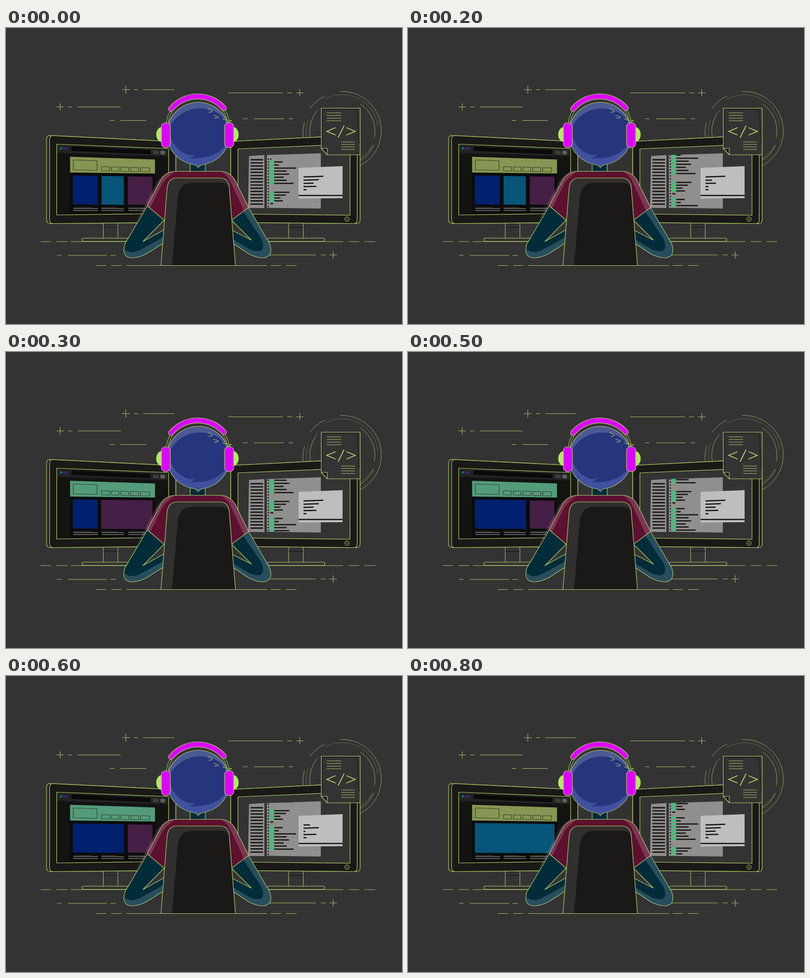
Write an HTML page without scripts that moves like this. It is 800x600 px and loops after 900 ms.

```html
<!DOCTYPE html>
<html lang="en">
<head>
<meta charset="utf-8">
<title>Developer at work</title>
<style>
  html, body { margin: 0; width: 100%; height: 100%; overflow: hidden; background: #333; }
  svg { display: block; width: 100vw; height: 100vh; }
  .line { fill: none; stroke: #a8c060; stroke-width: 1.1; }
  .thin { stroke: #98ac58; stroke-width: .9; }
  .edge { stroke: #abcb62; stroke-width: 1.2; stroke-linejoin: round; }
  .bold { stroke: #b1d166; stroke-width: 1.8; }
  .bezel { fill: #1a1917; }
  .shell { fill: #232321; }
  .bg { fill: #333; }
  .screen { fill: #131312; }
  .page { fill: #0b0b0b; }
  .navy { fill: #01216f; }
  .teal { fill: #075578; }
  .plum { fill: #451f45; }
  .shirt { fill: #5d1030; }
  .sleeve { fill: #032c3a; }
  .pink { fill: #dd05ff; }
  .lime { fill: #b2ea62; }
  .sheet { fill: #918f8d; }
  .note { fill: #bfbebc; }
  .ink { fill: none; stroke: #161616; stroke-width: 2.5; }
  .key { fill: none; stroke: #16dc6c; stroke-width: 8.5; }

  /* one loop is nine ticks of 100 ms */
  .banner { fill: #869653; animation: banner .9s step-end infinite; }
  .scroll { animation: scroll .9s steps(9) infinite; }
  .flash { animation: flash .9s step-end infinite; }
  .at1 { animation-delay: -.8s; }
  .at3 { animation-delay: -.6s; }
  .at5 { animation-delay: -.4s; }
  .at6 { animation-delay: -.3s; }
  .at7 { animation-delay: -.2s; }
  @keyframes scroll { to { transform: translateY(-90px); } }
  @keyframes banner { 33.33% { fill: #539c7b; } 77.77% { fill: #869653; } }
  @keyframes flash { 0% { opacity: 1; } 22.22%, 100% { opacity: 0; } }
</style>
</head>
<body>
<svg viewBox="0 0 800 600" preserveAspectRatio="none">
  <defs>
    <clipPath id="editor"><path d="M527 257.500 636 254V366L527 364.500Z"/></clipPath>
    <path id="skull" d="M380 277A63.500 63.500 0 1 1 397 277Q391 278.500 388.500 283Q386 278.500 380 277Z"/>
    <clipPath id="head"><use href="#skull"/></clipPath>
    <path id="band" d="M333.500 164A70 70 0 0 1 440 162.500"/>
    <g id="code">
      <path class="ink" d="M541 271.500H559M541 277.700H551M541 283.900H586M541 290.100H567M541 296.300H572M541 302.500H561M541 308.700H567M541 314.900H581
        M541 333H572.500M541 338.800H565.500M541 344.500H554.500M541 350.300H559.500M534 356H540"/>
      <path class="key" stroke-dasharray="3 3.2" d="M537.500 270V316.700"/>
      <path class="key" stroke-dasharray="3 2.75" d="M537.500 331.500V352"/>
      <path class="ink" stroke-dasharray="2.4 3.6" d="M530 264.500V360.500"/>
    </g>
    <g id="stand">
      <path class="line" d="M0 396V426M29.500 396V426"/>
      <path d="M0 404H29.500" stroke="#111"/>
    </g>
  </defs>

  <rect class="bg" width="800" height="600"/>

  <!-- floating dashes and plus signs -->
  <path class="line" d="M234 125H250M242 117V133M258 125H267M277 125H340
    M102 160H117M109.500 152.500V167.500M125 160H134M145 160H232
    M210 187.500H219M231 187.500H283
    M449 131.500H559.500M568 131.500H578M586 131.500H601M593.500 124V138.500
    M478.500 184H488M501 184H561M571 184H580
    M70 433H91M102 433H124M131 433H246M530 433H681M692 433H713.500M724 433H746
    M103 461H112M125 461H204M211 461H222M532 460H626M636 460H646M653.500 460H668.500M661 452.500V467.500
    M181 481.500H202M213 481.500H233M243 481.500H527M535 481.500H555M566 481.500H587"/>

  <!-- rings behind the document -->
  <path class="line thin" d="M675 128.500A80 80 0 0 1 716 279M614 163A80 80 0 0 1 644 138M600.500 222A80 80 0 0 1 603 191
    M615 222A66 66 0 0 1 629 167M716 154A66 66 0 0 1 744 222M743 237A72 72 0 0 1 716 268"/>
  <path class="line thin" stroke-dasharray="1.6 1.6" d="M645 144A72 72 0 0 1 751 200M607.500 221A72 72 0 0 1 611 186M740 238A68 68 0 0 1 716 264"/>

  <!-- left monitor -->
  <path class="shell edge" d="M82 225Q82 217 91 218L343 230.500V394L92 396.500Q82 397 82 389Z"/>
  <path class="bezel edge" d="M88 226Q88 218 95 218.200L343 230.500V394L95 396.500Q88 396 88 390Z"/>
  <path class="screen edge" d="M102.500 235.500 328.500 244.500V376L102.500 379Z"/>
  <path d="M104 237 327 245.500V260L104 253Z" fill="#232323"/>
  <path d="M132 240 292 247V256L132 249Z" fill="#0a0a0a"/>
  <path d="M297 248.500 309 249V256L297 255.500Z" fill="#3d3d3d"/>
  <path d="M312 248.500 321 249V256.500L312 256Z" fill="#5e5e5e"/>
  <circle cx="111" cy="244" r="2.300" fill="#087e7c"/>
  <circle cx="117" cy="244.200" r="2.300" fill="#1734a0"/>
  <circle cx="122.500" cy="244.500" r="2.300" fill="#55226c"/>
  <path class="page" d="M129.500 261 301 266V375L129.500 377Z"/>
  <path class="banner" d="M129.500 261 301 266.500V295L129.500 293Z"/>
  <path fill="none" stroke="#394229" stroke-width="1.200" d="M136 267.500 184 269V288.500L136 287.500ZM193 281 209 281.500V290L193 289.500ZM213 281.500 228 282V290.500L213 290ZM232 282 248 282.500V291L232 290.500ZM252 282.500 268 283V291.500L252 291ZM272 283 290 283.500V292L272 291.500Z"/>

  <path class="navy" d="M135 299 185.500 299.500V358L135 357.500Z"/>
  <path class="teal" d="M193 300 238 300.500V358.500L193 358Z"/>
  <path class="plum" d="M246 301 296 301.500V358.500L246 358Z"/>
  <g class="flash at3">
    <path class="page" d="M187 297H299V360H187Z"/>
    <path class="plum" d="M192 299.500 296 300.500V359L192 358.500Z"/>
  </g>
  <g class="flash at5">
    <path class="page" d="M132 297H245V360H132Z"/>
    <path class="navy" d="M135 299 238.500 300V358.500L135 358Z"/>
  </g>
  <g class="flash at7">
    <path class="page" d="M132 297H299V360H132Z"/>
    <path class="teal" d="M135 298 296 300V359L135 358.500Z"/>
  </g>
  <path fill="none" stroke="#747474" stroke-width="1.500" d="M136 366H186M136 370H186M193 366H238M193 370H238M247 366H296M247 370H296"/>
  <path stroke="#484848" d="M136 364H172M193 364H224M247 364H280"/>
  <use href="#stand" x="196.500"/>
  <rect class="bg edge" x="153.500" y="426" width="116" height="6.500" rx="3.200"/>

  <!-- right monitor -->
  <path class="shell edge" d="M454 230 708 217Q715.500 217 715.500 225V389Q715.500 397 707 396.500L454 394Z"/>
  <path class="bezel edge" d="M454 230 703 217.500Q709.500 217 709.500 225V389Q709.500 396 703 396.500L454 394Z"/>
  <path class="bg edge" d="M468.500 245 695 235.500V379.500L468.500 377Z"/>
  <circle class="line" cx="689" cy="387.500" r="4.400"/>
  <path class="line" d="M687 388H691"/>
  <use href="#stand" x="571"/>
  <rect class="bg edge" x="528" y="426" width="116" height="6.500" rx="3.200"/>

  <path class="sheet" d="M491 259.500 522 257.500V365L489 364.500Z"/>
  <path fill="none" stroke="#1b1b1b" stroke-width="25.500" stroke-dasharray="2.900 3.530" d="M506.500 265.500V359"/>
  <path class="sheet" d="M527 257.500 636 254V366L527 364.500Z"/>
  <g clip-path="url(#editor)">
    <g class="scroll">
      <path class="ink" d="M533.500 265.800H536"/>
      <use href="#code"/>
      <use href="#code" y="96"/>
    </g>
  </g>
  <path class="note" d="M591 283.500 680 280V345L591 345.500Z"/>
  <path class="ink" d="M591 339.500H680"/>
  <path class="ink" d="M601 302 641 300.500M601 308.500 632 307.500M601 315 621.500 314.500M601 321.500 627 321M601 327.800H607"/>
  <g class="flash at1">
    <path class="note" d="M597 305H644V325H597Z"/>
    <path class="ink" d="M601 308.500H614M601 315 622 314.500M601 321.500H607"/>
  </g>
  <g class="flash at6">
    <path class="note" d="M597 298H644V318H597Z"/>
    <path class="ink" d="M601 302H614M601 308.500 632 307.500M601 315H605"/>
  </g>

  <!-- code document -->
  <path class="bg edge" d="M637 162.500H715.500V257H649L637 244Z"/>
  <path fill="none" stroke="#171717" d="M639 164.500H709L714 235M639 165V241"/>
  <path class="edge bezel" d="M637 244H649V257Z"/>
  <path class="line" d="M648 172H677M648 177.300H677M648 182.700H677M648 188H677M677 231H705M677 236H705M677 241H705M677 246.300H705"/>
  <path class="line bold" d="M666 202 648 209.500 666 217M683 198 671 222M688 202 705.500 209.500 688 217"/>

  <!-- neck and body -->
  <path class="sleeve edge" d="M372 270H402.500V292H372Z"/>
  <path fill="#c6a0ad" fill-opacity=".2" d="M262 394 302 318Q315 292 342 290L310 318 285 361Z"/>
  <path class="sleeve edge" d="M285.500 360.500 240 438Q232 465 255 466Q271 465 285 457L321 434V388Z"/>
  <path class="sleeve edge" d="M490 364 533 438Q541 465 518 466Q503 465 489 457L455 434V388Z"/>
  <path fill="#89a7b8" fill-opacity=".28" d="M239 447Q248 459 269 451L318 424V436L285 457Q270 466 255 466Q238 465 239 447Z
    M490 365 533 438Q541 465 518 466Q503 465 489 457L458 437V428L491 448Q515 458 519 446Q521 438 516 427L480 373Z"/>
  <path class="bg edge" d="M321 388 276.500 433 321 408Z"/>
  <path class="bg edge" d="M455 389 496 430 455 409Z"/>
  <path class="shirt edge" d="M285.500 360.500 310 313Q320 291 342 290.500H433Q455 291 465 313L490 364 455 390H320Z"/>
  <path fill="#d9b0be" fill-opacity=".24" d="M285.500 360.500 310 313Q320 291 342 290.500L331 299Q319 307 311 325L291 365Z
    M433 290.500Q455 291 465 313L490 364 481 371 455 315Q448 297 433 290.500Z"/>

  <!-- chair -->
  <path class="edge" fill="#30302e" d="M313 481.500 325.500 324Q328 304 346 304H431Q449 304 451 322L463.500 481.500Z"/>
  <path class="bezel" d="M335.500 481 347 343Q350 313.500 379 313.500H431Q447 314 450 324L462.500 481Z"/>

  <!-- head -->
  <g clip-path="url(#head)">
    <path fill="#4b5a94" d="M320 145H460V285H320Z"/>
    <path fill="#4051a0" d="M320 220H460V285H320Z"/>
    <path fill="#26367d" d="M328 207C338 181 362 163 393 163C422 163 439 177 448 196V231C436 253 411 266 369 264Q378 262 383 256Q375 259 368 257C347 250 333 232 328 207Z"/>
  </g>
  <use class="line" href="#skull"/>
  <path class="line" fill="none" d="M437 184Q447 188 455.500 187.500Q451 192 445 192M407 164Q413 164 417 169Q414 171 409 171M419 177.500Q425 177 429 181Q426 183 421 182.500"/>

  <!-- headphones -->
  <path class="line" d="M332 168Q325 179 324 193M336 170Q329 181 328 193M438 168Q446 178 447 193M442 166Q450 178 451 193"/>
  <ellipse class="lime" cx="314.500" cy="216" rx="11" ry="15"/>
  <ellipse class="lime" cx="459" cy="216" rx="11" ry="15"/>
  <rect class="pink edge" x="314" y="192" width="18" height="50.500" rx="8"/>
  <rect class="pink edge" x="441.500" y="192" width="18.500" height="50.500" rx="8"/>
  <g fill="none" stroke-linecap="round">
    <use href="#band" stroke="#abcb62" stroke-width="11.500"/>
    <use href="#band" stroke="#dd05ff" stroke-width="9.200"/>
  </g>
</svg>
</body>
</html>
```
